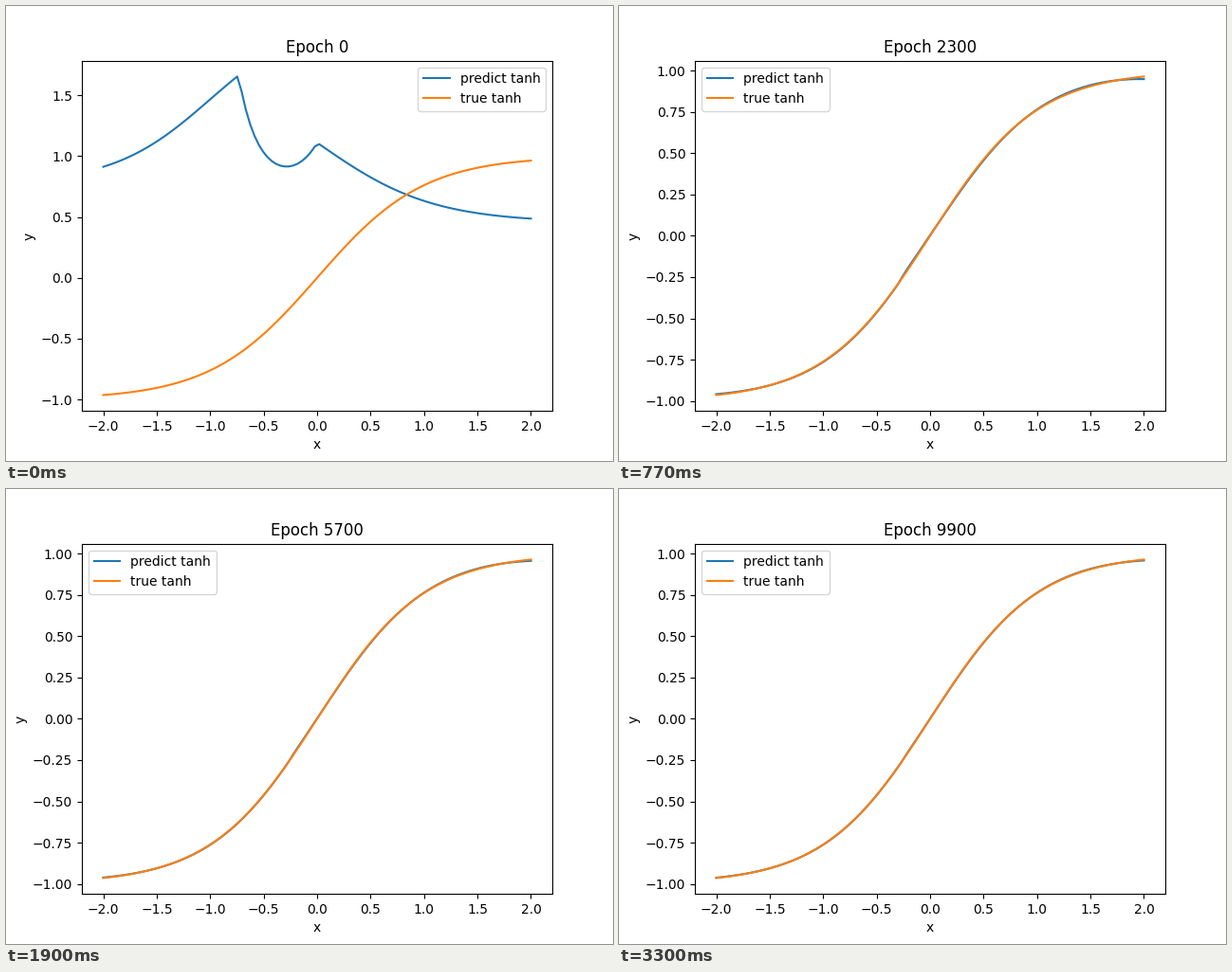
Write a matplotlib script that moves like this. It is 640x480 px and loops after 3.33 s.

```python
import numpy as np
import matplotlib.pyplot as plt
from matplotlib.animation import FuncAnimation

TICK = 10            # ms per drawn step
STEPS = 333          # 3330 ms in all
EPOCH_STEP = 100


def untrained(x):
    """A rising branch, a sharp dip and a falling branch."""
    left = 1.468 + 0.693 * np.tanh(1.1 * (x + 1))
    s = x + 0.735
    dip = 0.815 + 0.85 * np.exp(-s / 0.17) + 0.97 * s ** 4
    right = 1.112 - 0.656 * np.tanh(0.93 * x)
    return np.where(s < 0, left, np.where(x < 0, dip, right))


def predict(x, update):
    """Near-tanh fit whose error shrinks as a power of the update number."""
    if update == 0:
        return untrained(x)
    size = (6 / update) ** 0.7
    wave = np.where(x < 0,
                    0.014 * x * (x + 1.5),
                    0.07 * x * (x - 0.85) * (1.75 - x))
    kink = -0.24 - 0.14 * size
    u = np.maximum(x - kink, 0) / (0.06 + 0.09 * size)
    bump = 0.028 * u * np.exp(1 - u)
    return np.tanh(x) + size * (wave + bump)


x = np.linspace(-2, 2, 100)
fig, ax = plt.subplots(figsize=(6.4, 4.8), dpi=100)
guess, = ax.plot(x, untrained(x), label="predict tanh")
ax.plot(x, np.tanh(x), label="true tanh")
ax.set_xlabel("x")
ax.set_ylabel("y")
title = ax.set_title("Epoch 0")
legend = ax.legend(loc="upper right")


def draw(step):
    update = int((step + 0.5) * 0.3)   # 100 updates, 30 or 40 ms each
    guess.set_ydata(predict(x, update))
    ax.relim()
    ax.autoscale_view()
    title.set_text(f"Epoch {update * EPOCH_STEP}")
    legend.set_loc("upper left" if update else "upper right")
    return guess, title, legend


anim = FuncAnimation(fig, draw, frames=STEPS, interval=TICK,
                     init_func=lambda: draw(0), repeat=True, repeat_delay=0)
plt.show()
```
